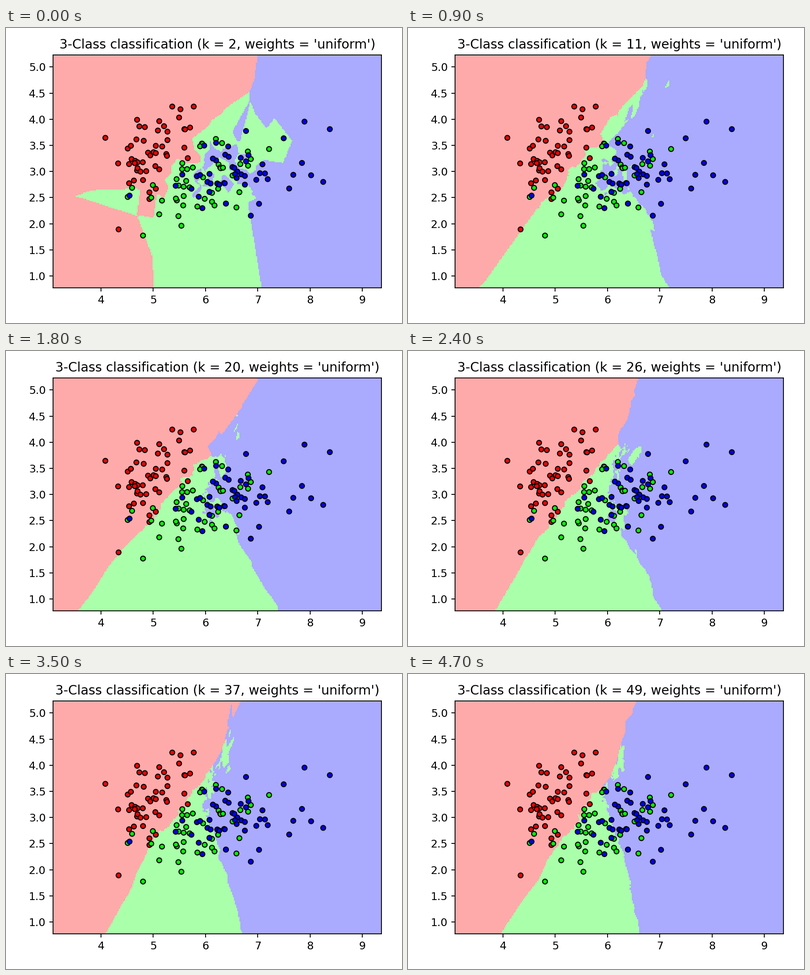
These frames come from a looping animation (867 by 646 pixels, 4800 ms). A matplotlib script:

```python
import numpy as np
import matplotlib.pyplot as plt
from matplotlib.animation import FuncAnimation

W, H, DPI = 867, 646, 169
LEFT, BOTTOM = 103.4, 569.0   # lower-left corner of the axes, in pixels
UNIT = 114.4                  # pixels per data unit
X0, Y0 = 3.085, 0.772         # data values at that corner
STEP, NX, NY = 0.02, 314, 223
K_MIN, K_MAX = 2, 49

plt.rcParams["font.family"] = "DejaVu Sans"

# Sample positions on the stage, one list per class
RED = [
    (217.5, 240.5), (364, 172), (382, 178), (411, 172), (379, 196),
    (287, 201), (292, 215.5), (304, 217), (335.5, 204), (346, 215),
    (332.5, 224.5), (353.5, 227), (390.5, 221.5), (392, 222), (403, 218),
    (285.5, 244), (301.5, 247), (353.5, 245.5), (266.5, 264), (273.5, 258),
    (328, 258), (342, 259.5), (390.5, 262), (398, 285), (245.5, 296.5),
    (275, 287), (269.5, 298), (283, 291), (288, 294), (282, 296),
    (299.5, 294), (311, 273), (316, 279), (323, 272), (328, 274),
    (351, 276), (352.5, 280), (327, 302.5), (335.5, 309.5), (287, 312),
    (288, 307), (294.5, 314.5), (307, 313.5), (280, 334), (300, 333),
    (269.5, 340), (328, 352), (314, 360), (314, 374.5), (246.5, 441),
]
GREEN = [
    (459.5, 243), (473, 252), (429, 253), (430, 254), (425, 259),
    (529.5, 270.5), (536, 287), (576, 265), (513, 298), (530, 301.5),
    (465.5, 299), (469, 305.5), (470, 307), (475, 306), (386, 296),
    (385.5, 309), (396.5, 309), (409, 305.5), (496, 323), (373.5, 331),
    (394.5, 335), (378, 345), (389, 347.5), (402, 349), (431.5, 327),
    (276, 350), (321.5, 344), (266.5, 370), (318, 371.5), (341.5, 378),
    (335.5, 408), (300, 454.5), (389, 368), (374, 377.5), (372, 373.5),
    (388, 388.5), (377.5, 412), (384, 433), (435, 374), (451, 361),
    (451, 380.5), (456.5, 388.5), (419, 391), (464.5, 352), (511, 359.5),
    (504.5, 393), (481.5, 384.5), (445.5, 359), (462.5, 340.5),
]
BLUE = [
    (653.5, 205), (709, 221.5), (608, 241.5), (525.5, 225.5), (434, 257.5),
    (460, 251.5), (486.5, 259.5), (460, 290), (453, 286), (480, 277.5),
    (487.5, 282), (514, 284.5), (531, 278.5), (525.5, 292), (561.5, 298.5),
    (496, 304.5), (500, 306.5), (506.5, 314.5), (501.5, 320), (515, 320.5),
    (523, 324), (505, 328.5), (523, 343), (548, 332.5), (556, 318),
    (567, 318.5), (573, 331), (648, 295.5), (629, 321.5), (668, 322.5),
    (694.5, 337), (620, 351.5), (554, 385), (536, 411), (481.5, 384.5),
    (477.5, 339.5), (479, 340), (463, 341), (467, 343), (441, 337),
    (448, 340.5), (445.5, 319.5), (418, 324.5), (425, 322), (386, 321),
    (371.5, 345.5), (406, 352), (422, 369.5), (445.5, 359), (430, 394.5),
    (270.5, 367),
]
CLASSES = [np.array(c, float) for c in (RED, GREEN, BLUE)]
POINT_COLORS = np.array(["#FF0000", "#00FF00", "#0000FF"])
AREA_RGB = np.array([[255, 170, 170], [170, 255, 170], [170, 170, 255]], np.uint8)


def to_data(px):
    return np.column_stack([X0 + (px[:, 0] - LEFT) / UNIT,
                            Y0 + (BOTTOM - px[:, 1]) / UNIT])


def class_maps(points, labels):
    """Majority class on the grid for each k from K_MIN to K_MAX."""
    gx, gy = np.meshgrid(X0 + STEP * np.arange(NX), Y0 + STEP * np.arange(NY))
    dist = ((gx.reshape(-1, 1) - points[:, 0]) ** 2
            + (gy.reshape(-1, 1) - points[:, 1]) ** 2)
    nearest = labels[np.argsort(dist, axis=1)[:, :K_MAX]]
    votes = np.zeros((NX * NY, 3), int)
    rows = np.arange(NX * NY)
    maps = []
    for k in range(1, K_MAX + 1):
        votes[rows, nearest[:, k - 1]] += 1
        if k >= K_MIN:
            maps.append(votes.argmax(axis=1).reshape(NY, NX).astype(np.uint8))
    return maps


points = to_data(np.vstack(CLASSES))
labels = np.repeat(np.arange(3), [len(c) for c in CLASSES])
maps = class_maps(points, labels)

x1, y1 = X0 + NX * STEP, Y0 + NY * STEP
fig = plt.figure(figsize=(W / DPI, H / DPI), dpi=DPI, facecolor="white")
ax = fig.add_axes([LEFT / W, 1 - BOTTOM / H,
                   (x1 - X0) * UNIT / W, (y1 - Y0) * UNIT / H])
area = ax.imshow(AREA_RGB[maps[0]], origin="lower", extent=(X0, x1, Y0, y1),
                 interpolation="nearest", aspect="auto")
ax.scatter(points[:, 0], points[:, 1], s=20, c=POINT_COLORS[labels],
           edgecolors="black", linewidths=1)
ax.set_xlim(X0, x1)
ax.set_ylim(Y0, y1)
ax.set_xticks(range(4, 10))
ax.set_yticks(np.arange(1, 5.1, 0.5))
title = ax.set_title("", fontsize=12, pad=6)


def update(i):
    area.set_data(AREA_RGB[maps[i]])
    title.set_text(f"3-Class classification (k = {K_MIN + i}, weights = 'uniform')")
    return area, title


anim = FuncAnimation(fig, update, frames=len(maps), interval=100,
                     repeat=True, repeat_delay=0)
plt.show()
```
